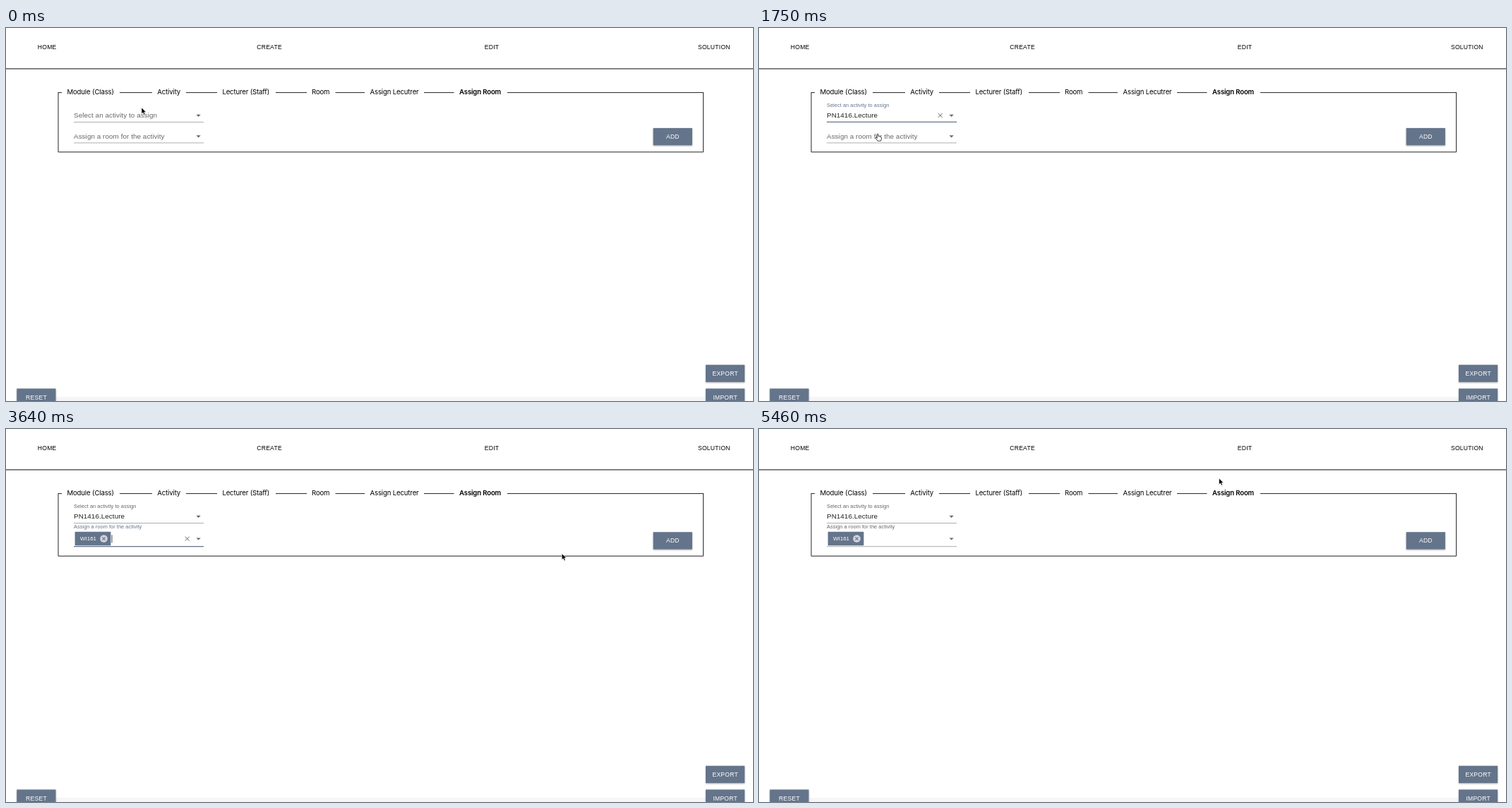
An HTML page for the animation above (5810 ms loop, 1058 by 529 pixels).

```html
<!DOCTYPE html>
<html lang="en">
<head>
<meta charset="utf-8">
<title>Assign room</title>
<style>
  html, body { margin: 0; width: 100%; height: 100%; overflow: hidden; background: #fff; }
  svg { display: block; width: 100vw; height: 100vh; }
  text { font: 9.8px "Liberation Sans", Arial, sans-serif; letter-spacing: .00938em; fill: #222; white-space: pre; }
  .caps { font-size: 8.575px; letter-spacing: .02857em; fill: #000; }
  .light { fill: #fff; }
  .mid { text-anchor: middle; }
  .tab { font: 9.6px Inter, sans-serif; letter-spacing: -.15px; fill: #000; }
  .bold { font-weight: 600; }
  .chip { font-size: 7.96px; letter-spacing: 0; fill: #fff; }
  .dialog { font: 7.96px Inter, sans-serif; letter-spacing: -.08px; fill: #202124; }
  .action { font: 500 7.4px Inter, sans-serif; letter-spacing: 0; text-anchor: middle; fill: #1a73e8; }
  .raised { filter: drop-shadow(0 1px 1.2px rgba(0,0,0,.32)); }
  .popup { filter: drop-shadow(0 1px 1px rgba(0,0,0,.3)); }
  .sheet { filter: drop-shadow(0 1px 5px rgba(0,0,0,.32)); }
</style>
</head>
<body>
<svg viewBox="0 0 1058 529" preserveAspectRatio="none"><g id="page"></g><g id="live"></g></svg>
<script>
const LOOP = 5810, STEP = 70;
const SLATE = '#64748b', INK = '#222', GREY = '#666';
const MODULE = 'PN1416', ROOM = 'WI161';
const LECTURE = MODULE + '.Lecture', EXERCISE = MODULE + '.Exercise';
const LEFT = 96, RIGHT = 280, CENTRE = 188;

// Moments at which the state of the form changes
const T = {
  hover1: 840, focus1: 1120, leave1: 1260, pick1: 1680,
  hover2: 1960, focus2: 2240, leave2: 2450, pick2: 2800,
  caretOn: 3290, caretOff: 3850, press: 4200, ask: 4340, confirm: 5110
};

// Pointer track: time, x, y, shape
const track = [
  [0, 192, 113, 'arrow'], [210, 192, 113, 'arrow'], [420, 187, 124, 'arrow'], [770, 187, 124, 'arrow'],
  [840, 185, 125, 'beam'], [980, 180, 125, 'beam'], [1190, 180, 125, 'beam'],
  [1260, 178, 134, 'hand'], [1540, 168, 150, 'hand'], [1890, 168, 150, 'hand'],
  [1960, 166, 150, 'beam'], [2100, 161.5, 149.5, 'beam'], [2380, 161.5, 149.5, 'beam'],
  [2450, 157, 160, 'hand'], [2590, 147, 184, 'hand'], [2730, 147, 184, 'hand'],
  [2800, 146, 185, 'arrow'], [3430, 146, 185, 'arrow'], [3710, 1001, 174, 'arrow'], [3780, 1001, 174, 'arrow'],
  [3990, 966, 165, 'hand'], [4060, 954.5, 161.5, 'hand'], [4270, 954.5, 161.5, 'hand'],
  [4340, 925, 146, 'arrow'], [4760, 655, 72, 'arrow'], [4830, 655, 72, 'arrow'],
  [4970, 650, 63, 'arrow'], [5110, 650, 63, 'arrow'], [5320, 651.5, 70, 'arrow'], [LOOP, 651.5, 70, 'arrow']
];
const shapes = {
  arrow: '<path d="M0 0v8.7l2-1.9 1.5 3.1 1.5-.7-1.4-3h2.7z" fill="#000" stroke="#fff" stroke-width=".5"/>',
  beam: '<path d="M-2-4.6q2 0 2 1.2v6.8q0 1.2-2 1.2M2-4.6q-2 0-2 1.2M0 3.4q0 1.2 2 1.2M-1 .9h2" fill="none" stroke="#111" stroke-width=".9"/>',
  hand: '<path d="M-.8.6q.8-1.2 1.6 0l.5 3 .9-.2.4.5 1-.1.4.6q1.3-.2 1.4 1.1v2.1l-1 2.6h-4.2l-3-3.8q-.1-1.2 1.2-.9l.8.8z" fill="#fff" stroke="#111" stroke-width=".8" stroke-linejoin="round"/>'
};

const between = (t, from, to) => t >= from && t < to;
const mix = (a, b, p) => a + (b - a) * p;
const settle = (t, start) => t < start ? 0 : [.26, .8, .97][Math.floor((t - start) / STEP)] ?? 1;

const rect = (x, y, w, h, fill, extra = '') =>
  `<rect x="${x}" y="${y}" width="${w}" height="${h}" fill="${fill}" ${extra}/>`;
const text = (x, y, str, cls = '', extra = '') => `<text x="${x}" y="${y}" class="${cls}" ${extra}>${str}</text>`;
const path = (d, stroke, width) => `<path d="${d}" fill="none" stroke="${stroke}" stroke-width="${width}"/>`;
const cross = (x, y, r, stroke, width) =>
  path(`M${x - r} ${y - r}l${2 * r} ${2 * r}M${x + r} ${y - r}l${-2 * r} ${2 * r}`, stroke, width);
const button = (x, y, label) =>
  rect(x, y, 55.2, 24.4, SLATE, 'class="raised"') + text(x + 27.7, y + 15.2, label, 'caps light mid');
const caret = (x, y) => rect(x, y, .8, 11, INK);

function label(str, y, rise, p, focused) {
  return text(LEFT, mix(y, y - rise, p), str, '',
    `style="font-size:${mix(9.8, 7.35, p)}px;fill:${focused ? SLATE : GREY}"`);
}

function underline(y, hovered, grow) {
  const half = (RIGHT - LEFT) / 2 * grow;
  return (hovered ? rect(LEFT, y - .6, 184, 1.2, '#111') : rect(LEFT, y - .2, 184, .7, '#8c8c8c')) +
    (grow > 0 ? rect(CENTRE - half, y - .6, 2 * half, 1.2, SLATE) : '');
}

function triangle(y, open) {
  return `<path d="M269.5 ${open ? y + 1.5 : y - 1.4}h6.2l-3.1 ${open ? -3.1 : 3.1}z" fill="#666"/>`;
}

function popup(y, items, active) {
  return rect(95.6, y, 184.8, items.length * 22 + 10, '#fff', 'rx="2" class="popup"') +
    (active ? rect(95.6, y + 5, 184.8, 22, '#f5f5f5') : '') +
    items.map((item, i) => text(106, y + 19.4 + i * 22, item)).join('');
}

function fieldset(bottom) {
  const gaps = [[74, 79], [161, 207], [255, 299], [382, 426], [466.5, 508], [592, 634.5], [710, 987.6]];
  return path(gaps.map(([a, b]) => `M${a} 91.6H${b}`).join('') + `M74 91.1V${bottom}H987.6V91.1`, INK, 1);
}

function activityField(t) {
  const focused = between(t, T.focus1, T.focus2);
  const picked = t >= T.pick1;
  return label('Select an activity to assign', 127.4, 15.4, settle(t, T.focus1), focused) +
    (picked ? text(LEFT, 127.4, LECTURE) : '') +
    (focused && picked ? cross(256.7, 124, 3, '#555', .9) : '') +
    (between(t, T.focus1, T.pick1) ? caret(96, 119.3) : '') +
    underline(133.3, between(t, T.hover1, T.leave1), settle(t, T.focus1) - settle(t, T.focus2)) +
    triangle(124.2, between(t, T.focus1, T.pick1));
}

function roomField(t) {
  const focused = between(t, T.focus2, T.confirm);
  const picked = t >= T.pick2;
  const chip = rect(97.6, 145.8, 50.8, 19.4, SLATE, 'rx=".6"') + text(105, 158.3, ROOM, 'chip') +
    '<circle cx="138.5" cy="155.5" r="5.3" fill="#d1d5dc"/>' + cross(138.5, 155.5, 2.1, SLATE, 1.1);
  return label('Assign a room for the activity', 156.9, 15.8, settle(t, T.focus2), focused) +
    (picked ? chip : '') +
    (focused && picked ? cross(256.7, 155.6, 3, '#555', .9) : '') +
    (between(t, T.focus2, T.pick2) ? caret(96, 148) : '') +
    (between(t, T.caretOn, T.caretOff) ? caret(149.6, 150.3) : '') +
    underline(picked ? 166.6 : 162.8, between(t, T.hover2, T.leave2), settle(t, T.focus2) - settle(t, T.confirm)) +
    triangle(picked ? 155.8 : 153.7, between(t, T.focus2, T.pick2));
}

function dialog() {
  const lines = ['Do you want to add', 'null:', `${LECTURE}: ${ROOM}`];
  return rect(393, -10, 275.5, 91.5, '#fff', 'rx="2" class="sheet"') +
    lines.map((line, i) => text(403, 15 + i * 12.1, line, 'dialog')).join('') +
    rect(565.3, 52.3, 43.8, 19, '#fff', 'rx="2" stroke="#dadce0" stroke-width=".6"') +
    text(587.2, 64.6, 'Cancel', 'action') +
    rect(614.3, 52, 44.4, 19.6, '#1a73e8', 'rx="2"') +
    text(636.5, 64.6, 'OK', 'action', 'style="fill:#fff"');
}

function pointer(t) {
  const i = track.findLastIndex(point => point[0] <= t);
  const [t0, x0, y0, shape] = track[i];
  const [t1, x1, y1] = track[i + 1];
  const p = (t - t0) / (t1 - t0);
  return `<g transform="translate(${mix(x0, x1, p)} ${mix(y0, y1, p)})">${shapes[shape]}</g>`;
}

function pressRing() {
  return '<circle cx="955.2" cy="161.6" r="17.6" fill="none" stroke="#fff" stroke-opacity=".6" stroke-width="1"/>' +
    '<circle cx="955.2" cy="161.6" r="18.6" fill="none" stroke="#111" stroke-width="1.1"/>';
}

function scene(t) {
  const drop = t >= T.pick2 ? 4.3 : 0;
  return fieldset(175.9 + drop) + button(916.7, 141.9 + drop, 'ADD') +
    activityField(t) + roomField(t) +
    (between(t, T.focus1, T.pick1) ? popup(134, [LECTURE, EXERCISE], t > 1330) : '') +
    (between(t, T.focus2, T.pick2) ? popup(163.5, [ROOM], t > 2500) : '') +
    (between(t, T.press, T.press + STEP) ? pressRing() : '') +
    (between(t, T.ask, T.confirm) ? dialog() : '') +
    pointer(t);
}

const nav = [[44.8, 'HOME'], [355.3, 'CREATE'], [677.8, 'EDIT'], [980, 'SOLUTION']];
const tabs = [[86.5, 'Module (Class)'], [214.3, 'Activity'], [306.4, 'Lecturer (Staff)'],
  [433, 'Room'], [515.5, 'Assign Lecutrer'], [642, 'Assign Room', 'bold']];

document.getElementById('page').innerHTML =
  nav.map(([x, str]) => text(x, 30.1, str, 'caps')).join('') +
  rect(0, 57.3, 1058, 1.1, INK) +
  tabs.map(([x, str, weight = '']) => text(x, 94.3, str, 'tab ' + weight)).join('') +
  rect(71, 523, 920, 6, '#f6f6f6') +
  button(991, 477.7, 'EXPORT') + button(991, 511.4, 'IMPORT') + button(15.3, 511.4, 'RESET');

const live = document.getElementById('live');
const start = performance.now();
let shown = -1;
function tick() {
  const t = Math.floor((performance.now() - start) % LOOP / STEP) * STEP;
  if (t !== shown) live.innerHTML = scene(shown = t);
  requestAnimationFrame(tick);
}
tick();
</script>
</body>
</html>
```
